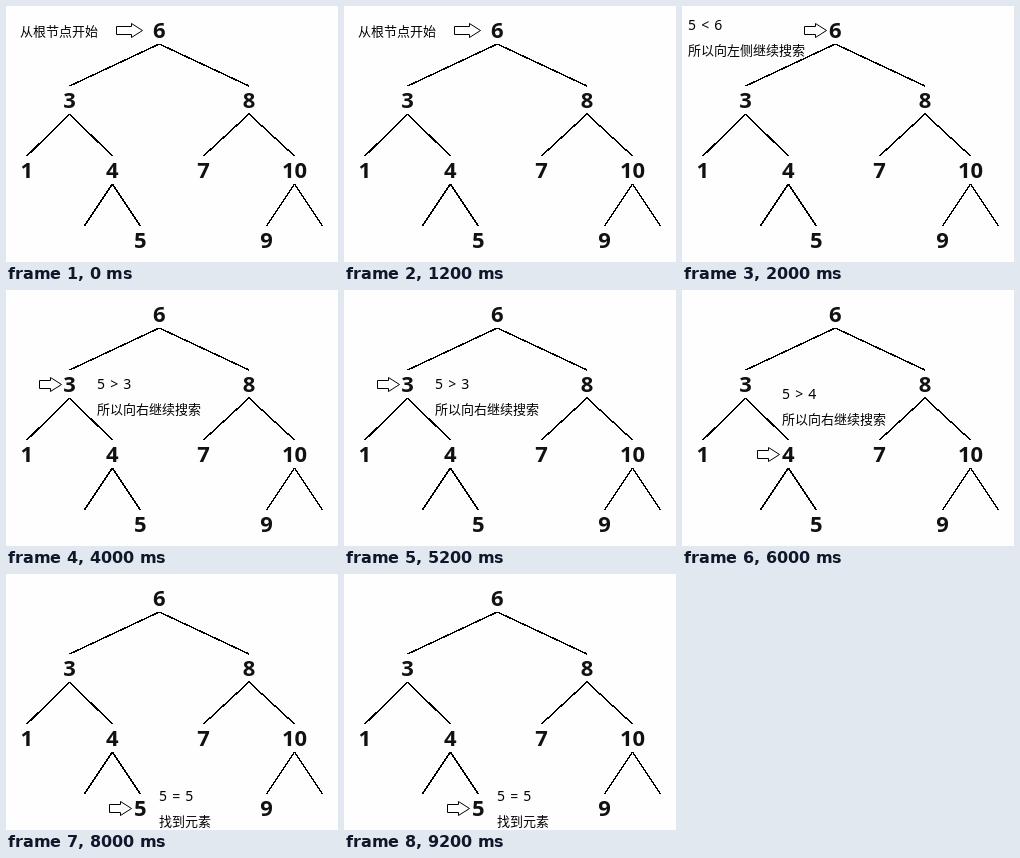
Recreate the animation shown at these times as an HTML page. Size 332 by 256 pixels, loop 10 s.

```html
<!DOCTYPE html>
<html lang="zh-CN">
<head>
<meta charset="utf-8">
<title>二叉树搜索</title>
<style>
html, body { margin: 0; width: 100%; height: 100%; overflow: hidden; background: #fefefe; }
svg { display: block; width: 332px; height: 256px; }
.node { font: bold 22px "Noto Sans", "Open Sans", sans-serif; text-anchor: middle; fill: #111; }
.note { font: 13px "Noto Sans CJK SC", "Noto Sans CJK", sans-serif; }
.compare { font: 14px "Noto Sans", "Open Sans", sans-serif; word-spacing: 1.5px; }
path { fill: none; stroke: #000; }
.edge { stroke-width: 1.5; shape-rendering: crispEdges; }
.arrow { fill: #fff; }
</style>
</head>
<body>
<svg viewBox="0 0 332 256">
  <g id="tree"></g>
  <g id="step"></g>
</svg>
<script>
const $ = id => document.getElementById(id);
const ROW = 70, HOLD = 2000, WANTED = 5;

// spread: horizontal distance to both children
const node = (value, spread = 0, left, right) => ({ value, spread, left, right });
const root = node(6, 89.7,
  node(3, 42.7, node(1), node(4, 28, null, node(5))),
  node(8, 45.5, node(7), node(10, 28, node(9))));

const text = (kind, x, y, s) => `<text class="${kind}" x="${x}" y="${y}">${s}</text>`;

// Places a node, then draws it with its edges and children
function grow(n, x, y) {
  Object.assign(n, { x, y });
  let out = text('node', x, y + 7.5, n.value);
  if (!n.spread) return out;
  for (const [child, side] of [[n.left, -1], [n.right, 1]]) {
    const cx = x + side * n.spread;
    out += `<path class="edge" d="M${x} ${y + 13.5}L${cx} ${y + 55.5}"/>`;
    if (child) out += grow(child, cx, y + ROW);
  }
  return out;
}
$('tree').innerHTML = grow(root, 153.3, 24.5);

function arrow(n, gap = 9, length = 22) {
  const tip = Math.round(n.x - gap) + .5;
  return `<path class="arrow" d="M${tip - length} ${n.y - 4}h${length - 11}v-3` +
    `l11 7l-11 7v-3h${11 - length}Z"/>`;
}

const steps = [arrow(root, 17, 26) + text('note', 14, 30, '从根节点开始')];
const spots = [[6, 24], [91, 99], [100, 109], [153, 227]];

// Walks down the tree, one step per comparison
for (let n = root; n;) {
  const { value } = n, [x, y] = spots[steps.length - 1];
  const [sign, note, next] =
    WANTED < value ? ['&lt;', '所以向左侧继续搜索', n.left] :
    WANTED > value ? ['&gt;', '所以向右继续搜索', n.right] :
    ['=', '找到元素', null];
  steps.push(arrow(n) + text('compare', x, y, `${WANTED} ${sign} ${value}`) +
    text('note', x, y + 24.5, note));
  n = next;
}

let current = -1;
function tick() {
  const index = Math.floor(performance.now() / HOLD) % steps.length;
  if (index !== current) $('step').innerHTML = steps[current = index];
  requestAnimationFrame(tick);
}
tick();
</script>
</body>
</html>
```
